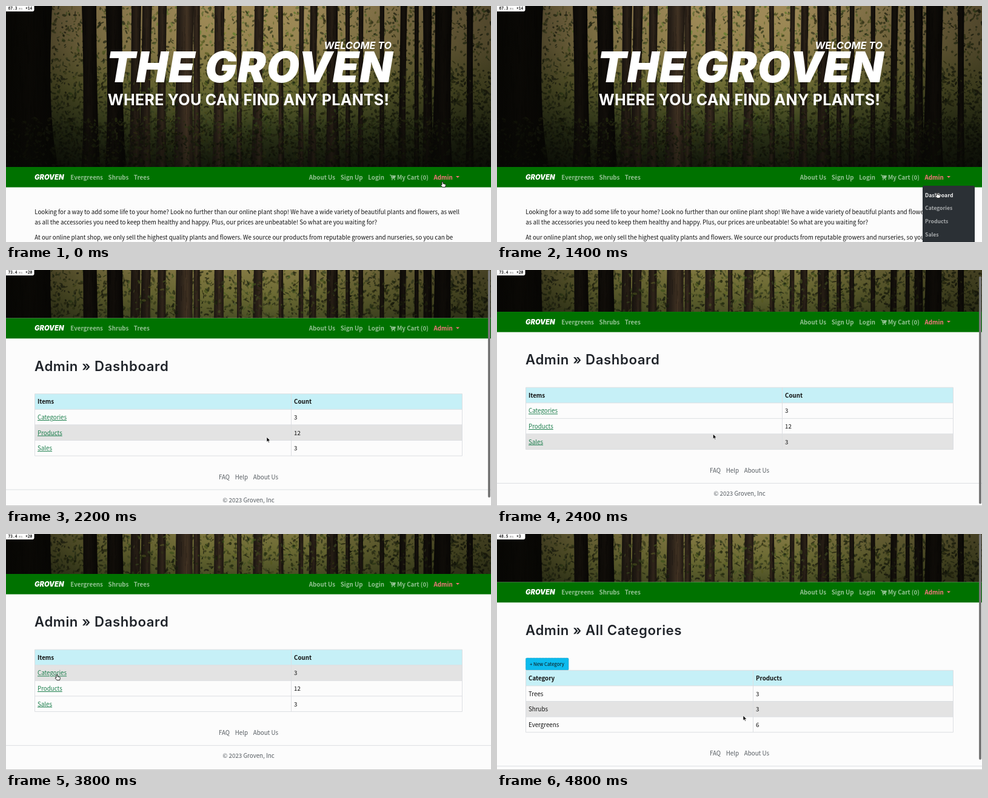
An HTML page with a canvas for the animation above (5 s loop, 800x390 px).

```html
<!DOCTYPE html>
<html lang="en">
<head>
<meta charset="utf-8">
<title>Plant shop admin</title>
<style>
html, body { margin: 0; width: 100%; height: 100%; overflow: hidden; background: #fcfcfc; }
canvas, svg { position: absolute; left: 0; top: 0; }
text { font: 9.75px "Noto Sans CJK JP", "Noto Sans CJK SC", "Noto Sans", sans-serif; fill: #111; white-space: pre; }
.b { font-weight: 700; }
.nav { font-weight: 700; fill: #93c393; }
.admin { font-weight: 700; fill: #f3777c; }
.link { fill: #1a7d4b; text-decoration: underline; }
.foot { fill: #555b60; }
.item { font-size: 8.7px; font-weight: 700; fill: #a5a8aa; }
.item.lit { fill: #eee; }
.small { font-size: 7.8px; }
.hero, .brand, .sub, .slogan, .title { font-family: Inter, "Open Sans", sans-serif; fill: #fff; }
.hero { font-size: 70px; font-weight: 900; font-style: italic; letter-spacing: 1.1px; }
.brand { font-size: 11.2px; font-weight: 900; font-style: italic; }
.sub { font-size: 16.2px; font-weight: 700; font-style: italic; }
.slogan { font-size: 25px; font-weight: 700; letter-spacing: .3px; }
.title { font-size: 22.2px; font-weight: 600; fill: #20242a; letter-spacing: .6px; }
.badge { font: 700 6.3px "Noto Sans Mono", monospace; fill: #222; }
.unit { font-size: 5.6px; font-weight: 400; fill: #888; }
</style>
</head>
<body>
<canvas id="forest" width="800" height="266"></canvas>
<svg id="page" width="800" height="390" viewBox="0 0 800 390"></svg>
<script>
const forest = document.getElementById('forest');
const page = document.getElementById('page');
const STEP = 200, COUNT = 25, ROW = 25.6, GAP = 8.7;

// ---- forest backdrop
function drawForest() {
  const c = forest.getContext('2d');
  let seed = 11;
  const rnd = () => (seed = (seed * 16807) % 2147483647) / 2147483647;
  const glow = x => Math.exp(-(((x - 350) / 260) ** 2));
  const shade = (x0, y0, x1, y1, ...colors) => {
    const g = c.createLinearGradient(x0, y0, x1, y1);
    colors.forEach((col, i) => g.addColorStop(i / (colors.length - 1), col));
    return g;
  };
  const wash = g => { c.fillStyle = g; c.fillRect(0, 0, 800, 266); };
  const leaves = (n, top, light) => {
    for (let i = 0; i < n; i++) {
      const x = rnd() * 800, y = top + rnd() * (266 - top);
      const l = light * (.35 + rnd()) * (1 - y / 400) * (.7 + .3 * glow(x));
      c.fillStyle = `hsla(${58 + rnd() * 26},${30 + rnd() * 20}%,${l}%,.7)`;
      c.beginPath();
      c.ellipse(x, y, 1 + rnd() * 3, .7 + rnd() * 1.5, rnd() * 3, 0, 7);
      c.fill();
    }
  };
  const trunk = (x, w, l) => {
    const foot = x + (rnd() - .5) * 8, left = x - w / 2, right = x + w / 2;
    c.fillStyle = shade(left, 0, right, 0, `hsl(28,25%,${l * .7}%)`, `hsl(30,30%,${l * 1.2}%)`, `hsl(30,28%,${l * .5}%)`);
    c.beginPath();
    c.moveTo(left, 0);
    c.lineTo(right, 0);
    c.quadraticCurveTo(foot + w * .4, 190, foot + w * .65, 266);
    c.lineTo(foot - w * .65, 266);
    c.quadraticCurveTo(foot - w * .4, 190, left, 0);
    c.fill();
    for (let i = 0; i < w * 2; i++) {
      c.fillStyle = `rgba(0,0,0,${rnd() * .3})`;
      c.fillRect(x + (rnd() - .5) * w * .8, rnd() * 230, 1, 8 + rnd() * 30);
    }
  };
  wash(shade(0, 0, 0, 266, '#a18b59', '#94834f', '#6b6a33', '#353d1c', '#1a2010'));
  leaves(4200, 0, 31);
  for (let x = 215; x < 800; x += 15 + rnd() * 24) trunk(x, 6 + rnd() * 13, 5 + 9 * glow(x));
  leaves(1500, 110, 29);
  trunk(137, 24, 6);
  trunk(178, 27, 5);
  trunk(298, 24, 17);
  trunk(722, 28, 5);
  trunk(37, 78, 4);
  leaves(2200, 185, 27);
  wash(shade(0, 0, 800, 0, 'rgba(6,6,3,.75)', 'rgba(6,6,3,.2)', 'rgba(6,6,3,0)', 'rgba(6,6,3,0)', 'rgba(6,6,3,.25)', 'rgba(6,6,3,.5)'));
  wash(shade(0, 190, 0, 266, 'rgba(6,8,4,0)', 'rgba(6,8,4,.4)'));
}

// ---- markup helpers
const text = (x, y, cls, s, more = '') => `<text x="${x}" y="${y}" class="${cls}" ${more}>${s}</text>`;
const rect = (x, y, w, h, fill, more = '') => `<rect x="${x}" y="${y}" width="${w}" height="${h}" fill="${fill}" ${more}/>`;
const line = (x, y, d, col = '#dcdfe2') => `<path d="M${x} ${y}${d}" stroke="${col}" fill="none"/>`;
const at = (x, y, s) => `<g transform="translate(${x} ${y})">${s}</g>`;
const spaced = words => words.map((w, i) => `<tspan dx="${i ? GAP : 0}">${w}</tspan>`).join('');
const MID = 'text-anchor="middle"', END = 'text-anchor="end"';

const CART = '<path d="M0 .8H2L3.4 6.4H8.6M2.4 2H9.4L8.6 5H3.2Z" fill="#93c393" stroke="#93c393"/>' +
  '<circle cx="3.9" cy="8.2" r="1" fill="#93c393"/><circle cx="8" cy="8.2" r="1" fill="#93c393"/>';

const navBar = () => rect(0, 0, 800, 33.6, '#007200') +
  text(47, 20.8, 'brand', 'GROVEN') +
  text(106.3, 20.6, 'nav', spaced(['Evergreens', 'Shrubs', 'Trees'])) +
  text(624, 20.6, 'nav', spaced(['About Us', 'Sign Up', 'Login']), END) +
  at(633, 12.5, CART) + text(697, 20.6, 'nav', 'My Cart (0)', END) +
  text(705.5, 20.6, 'admin', 'Admin') + '<path d="M742 15h6l-3 3z" fill="#f3777c"/>';

const home = () =>
  text(636, 71, 'sub', 'WELCOME TO', END) +
  text(402, 125.5, 'hero', 'THE GROVEN', MID) +
  text(400, 164, 'slogan', 'WHERE YOU CAN FIND ANY PLANTS!', MID) +
  text(47.3, 344.2, '', 'Looking for a way to add some life to your home? Look no further than our online plant shop! We have a wide variety of beautiful plants and flowers, as well') +
  text(47.3, 360.5, '', 'as all the accessories you need to keep them healthy and happy. Plus, our prices are unbeatable! So what are you waiting for?') +
  text(47.3, 385.5, '', 'At our online plant shop, we only sell the highest quality plants and flowers. We source our products from reputable growers and nurseries, so you can be');

const menu = lit => rect(702, 297, 86, 110, '#2b3035', 'rx="2"') +
  ['Dashboard', 'Categories', 'Products', 'Sales'].map((s, i) =>
    text(706, 315.6 + i * 21.7, lit && !i ? 'item lit' : 'item', s)).join('');

function table(top, split, rows, cls, pointerY) {
  const h = ROW * rows.length;
  let s = rect(47.5, top, 705, ROW, '#c6f0f7');
  rows.forEach(([a, b], i) => {
    const y = top + i * ROW;
    if (i && pointerY >= y && pointerY < y + ROW) s += rect(47.5, y, 705, ROW, '#e3e3e3');
    s += text(52, y + 16.7, i ? cls : 'b', a) + text(split + 4.5, y + 16.7, i ? '' : 'b', b);
    s += line(47.5, y, 'h705');
  });
  return s + line(47.5, top, `v${h}h705v${-h}`) + line(split, top, `v${h}`);
}

const footer = y => text(400, y, 'foot', spaced(['FAQ', 'Help', 'About Us']), MID) +
  line(0, y + 17.3, 'h800') + text(400, y + 38.3, 'foot', '© 2023 Groven, Inc', MID);

const dashboard = py => text(47, 166.5, 'title', 'Admin » Dashboard') +
  table(204.7, 470.5, [['Items', 'Count'], ['Categories', 3], ['Products', 12], ['Sales', 3]], 'link', py) +
  footer(345.7);

const categories = py => text(47, 166.5, 'title', 'Admin » All Categories') +
  rect(47.5, 205, 70.5, 20, '#0dbbed', 'rx="1.5" stroke="#0a93bb" stroke-width=".8" stroke-dasharray="1.5 1"') +
  text(54, 217.8, 'small', '+ New Category') +
  table(225.3, 422.5, [['Category', 'Products'], ['Trees', 3], ['Shrubs', 3], ['Evergreens', 6]], '', py) +
  footer(366.3);

const badge = (ms, n) => '<path d="M0 0H46.5V6Q46.5 9 43.5 9H0Z" fill="#fff"/>' +
  text(3.5, 6, 'badge', ms) + text(21, 6, 'badge unit', 'ms') + text(32, 6, 'badge', '×' + n);

const CURSORS = {
  arrow: '<path d="M0 0V8.2L1.9 6.5L3.2 9.3L4.5 8.7L3.2 6H5.8Z" fill="#000" stroke="#fff" stroke-width=".7"/>',
  hand: '<path d="M-1 1Q0-.6 1 1V3.6L4.6 4.4Q5.6 4.8 5.3 6.4L4.6 9.4H-.2L-2.8 6.2Q-3 4.8-1 5.6Z" fill="#fff" stroke="#111" stroke-width=".9"/>',
  beam: '<path d="M-1.8-4Q0-4 0-3Q0-4 1.8-4M0-3V4M-1.8 5Q0 5 0 4Q0 5 1.8 5" fill="none" stroke="#222" stroke-width=".9"/>'
};

// ---- timeline in steps; the pointer runs straight between stops
const stops = [[0, 720, 290], [3, 720, 289], [5, 726, 308], [8, 726, 308], [11, 430, 276],
  [14, 209, 261], [16, 95, 224], [19, 84, 232], [22, 84, 232], [24, 406, 300]];

function pointer(k) {
  const i = Math.max(1, stops.findIndex(s => s[0] >= k));
  const [k0, x0, y0] = stops[i - 1], [k1, x1, y1] = stops[i];
  const u = (k - k0) / (k1 - k0);
  return [x0 + (x1 - x0) * u, y0 + (y1 - y0) * u];
}

const scrollAt = k => k < 12 || k > 22 ? 0 : 13.6 * (1 - Math.exp(1.5 * (11 - k)));

function render(k) {
  const [x, y] = pointer(k), scroll = scrollAt(k);
  const isHome = k < 8, isList = k >= 22;
  const nav = isHome ? 266 : 79.6 - scroll;
  forest.style.top = (isHome ? 0 : -93 - scroll) + 'px';
  let s = rect(0, nav, 800, 390, '#fcfcfc') + at(0, nav, navBar());
  if (isHome) s += home() + (k >= 3 ? menu(k >= 5) : '');
  else {
    s += at(0, -scroll, (isList ? categories : dashboard)(y + scroll)) + line(0, 389.5, 'h800', '#c8c8c8');
    if (k >= 11 && k <= 15 || k >= 23) s += rect(795, scroll, 4, isList ? 373 : 376, '#777', 'rx="2"');
  }
  s += isHome ? badge('67.3', 14) : !isList ? badge('73.4', 20) : k < 23 ? badge('50.4', 2) : badge('48.5', 3);
  const kind = k === 22 ? 'beam' : isHome || k >= 16 && k < 22 ? 'hand' : 'arrow';
  page.innerHTML = s + at(x, y, CURSORS[kind]);
}

let shown = -1;
function tick() {
  const k = Math.floor(performance.now() / STEP) % COUNT;
  if (k !== shown) render(shown = k);
  requestAnimationFrame(tick);
}
drawForest();
tick();
</script>
</body>
</html>
```
